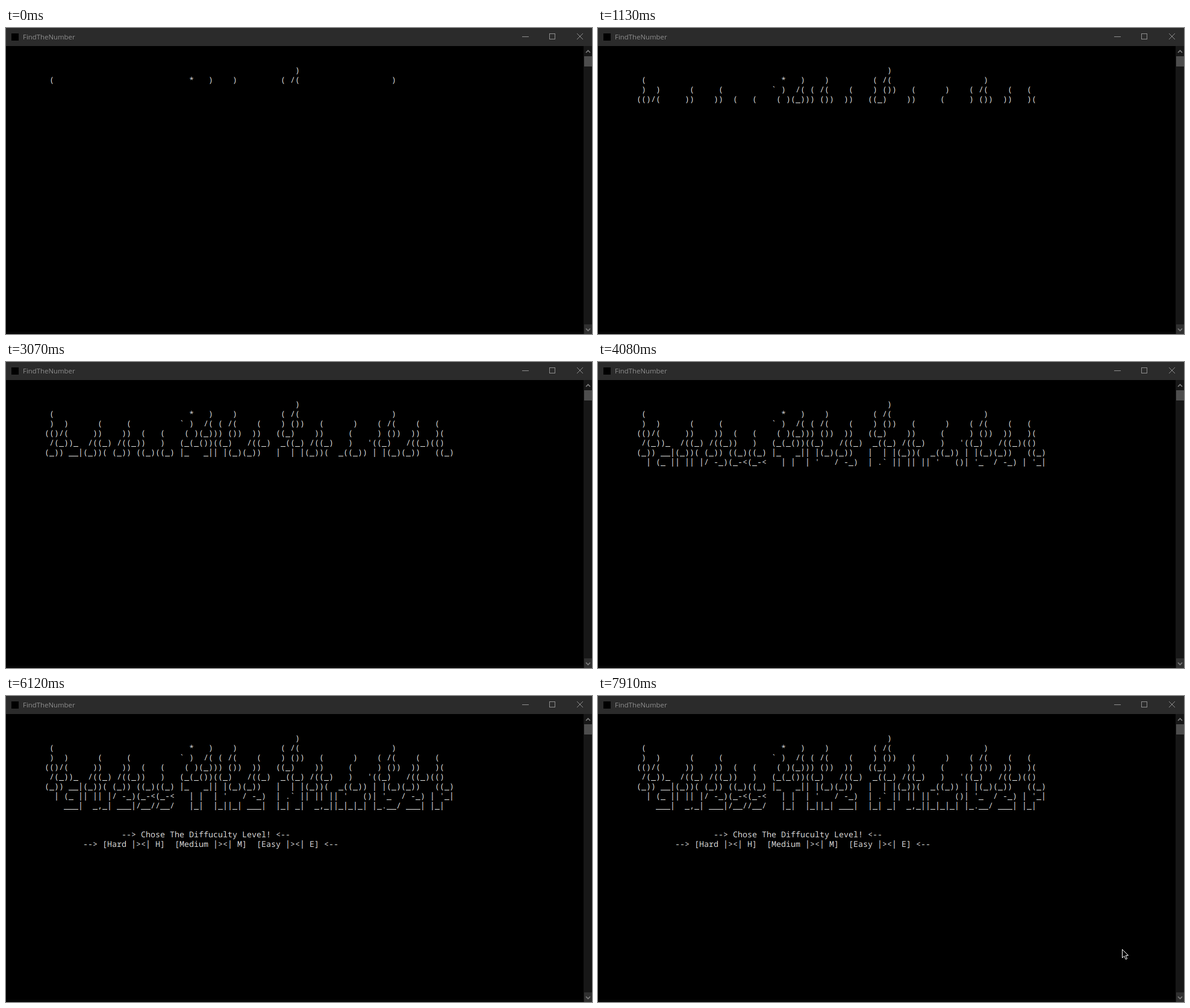
Write an HTML page with a canvas that moves like this. It is 973 by 509 pixels and loops after 7990 ms.

```html
<!DOCTYPE html>
<html lang="en">
<head>
<meta charset="utf-8">
<title>FindTheNumber</title>
<style>
  html, body { margin: 0; width: 100%; height: 100%; overflow: hidden; background: #000; }
  canvas { display: block; }
</style>
</head>
<body>
<canvas id="stage" width="973" height="509"></canvas>
<script>
const ctx = document.getElementById('stage').getContext('2d');
const LOOP = 7990, CELL_W = 8, CELL_H = 16, TOP = 30, GRAY = '#8e8e8e';

const SCREEN = [
  "",
  "",
  "                                                            )",
  "         (                            *   )    )         ( /(                   )",
  "         )  )      (     (          ` )  /( ( /(    (    ) ())   (      )    ( /(    (   (",
  "        (()/(     ))    ))  (   (    ( )(_))) ())  ))   ((_)    ))     (     ) ())  ))   )(",
  "         /(_))_  /((_) /((_))   )   (_(_())((_)   /((_)  _((_) /((_)   )   '((_)   /((_)(()",
  "        (_)) __|(_))( (_)) ((_)((_) |_   _|| |(_)(_))   |  | |(_))(  _((_)) | |(_)(_))   ((_)",
  "          | (_ || || |/ -_)(_-<(_-<   | |  | '   / -_)  | .` || || || '   ()| '_  / -_) | '_|",
  "            ___|  _,_| ___|/__//__/   |_|  |_||_| ___|  |_| _|  _,_||_|_|_| |_.__/ ___| |_|",
  "",
  "",
  "                        --> Chose The Diffuculty Level! <--",
  "                --> [Hard |><| H]  [Medium |><| M]  [Easy |><| E] <--"
];

// The heading prints one row per second; both menu rows come together.
const FIRST_TIMED_ROW = 4, MENU_STEP = 6;
function rowTime(row) {
  if (row < FIRST_TIMED_ROW) return 0;
  return 70 + 1000 * Math.min(row - FIRST_TIMED_ROW, MENU_STEP);
}

const POINTER_START = { x: 936, y: 505 }, POINTER_STEP = 75;
const MOVES = [
  { start: 6420, steps: 3, x: 955, y: 493 },
  { start: 6820, steps: 3, x: 929, y: 479 },
  { start: 7680, steps: 4, x: 870, y: 421 }
];

function rect(color, x, y, w, h) {
  ctx.fillStyle = color;
  ctx.fillRect(x, y, w, h);
}

function path(points, closed) {
  ctx.beginPath();
  points.forEach(([x, y]) => ctx.lineTo(x, y));
  if (closed) ctx.closePath();
}

function strokePath(color, width, points, closed) {
  path(points, closed);
  ctx.strokeStyle = color;
  ctx.lineWidth = width;
  ctx.stroke();
}

function drawTitleBar() {
  rect('#2b2b2b', 0, 0, 973, TOP);
  rect('#000', 9, 9, 12, 12);
  ctx.fillStyle = GRAY;
  ctx.font = '11.4px "Open Sans", sans-serif';
  ctx.fillText('FindTheNumber', 28, 19);
  rect(GRAY, 857, 14, 11, 1);
  ctx.strokeStyle = GRAY;
  ctx.lineWidth = 1;
  ctx.strokeRect(902.5, 9.5, 9, 9);
  strokePath(GRAY, 1, [[948, 9], [958, 19]]);
  strokePath(GRAY, 1, [[958, 9], [948, 19]]);
}

function drawChevron(y, rise) {
  strokePath('#808080', 1.6, [[963, y], [966.5, y + rise], [970, y]]);
}

function drawScrollBar() {
  rect('#171717', 959, TOP, 14, 479);
  rect('#4d4d4d', 960, 47, 13, 17);
  rect('#303030', 960, 493, 13, 16);
  drawChevron(41, -3.5);
  drawChevron(500, 3.5);
}

function drawRow(text, row, shift) {
  const baseline = TOP + row * CELL_H + 13;
  [...text].forEach((char, column) => {
    const x = column * CELL_W + shift;
    if (char === '|') ctx.fillRect(x + 3.4, baseline - 11, 1.1, 14);
    else if (char !== ' ') ctx.fillText(char, x, baseline);
  });
}

// Subpixel text: each colour channel is shifted by a third of a pixel.
function drawConsole(time) {
  ctx.save();
  ctx.globalCompositeOperation = 'lighter';
  ctx.font = '13.3333px "Noto Sans Mono", monospace';
  ctx.textRendering = 'geometricPrecision';
  ['#d00', '#0d0', '#00d'].forEach((channel, i) => {
    ctx.fillStyle = channel;
    SCREEN.forEach((text, row) => {
      if (time >= rowTime(row)) drawRow(text, row, (1 - i) / 3);
    });
  });
  ctx.restore();
}

function pointerAt(time) {
  let { x, y } = POINTER_START;
  for (const move of MOVES) {
    if (time < move.start) break;
    const step = Math.floor((time - move.start) / POINTER_STEP) + 1;
    const progress = Math.min(1, step / move.steps);
    x += (move.x - x) * progress;
    y += (move.y - y) * progress;
  }
  return [Math.round(x), Math.round(y)];
}

function drawPointer(x, y) {
  const outline = [[0, 0], [0, 14], [3.3, 11], [5.8, 16.5], [8, 15.5], [5.7, 10.2], [10, 10]];
  const points = outline.map(([dx, dy]) => [x + dx + 0.5, y + dy + 0.5]);
  path(points, true);
  ctx.fillStyle = '#000';
  ctx.fill();
  strokePath('#fff', 1, points, true);
}

function draw(time) {
  rect('#000', 0, 0, 973, 509);
  rect('#060606', 0, 505, 959, 4);
  drawConsole(time);
  drawTitleBar();
  drawScrollBar();
  if (time >= MOVES[0].start) drawPointer(...pointerAt(time));
}

const startTime = performance.now();
function tick() {
  draw((performance.now() - startTime) % LOOP);
  requestAnimationFrame(tick);
}
tick();
</script>
</body>
</html>
```
